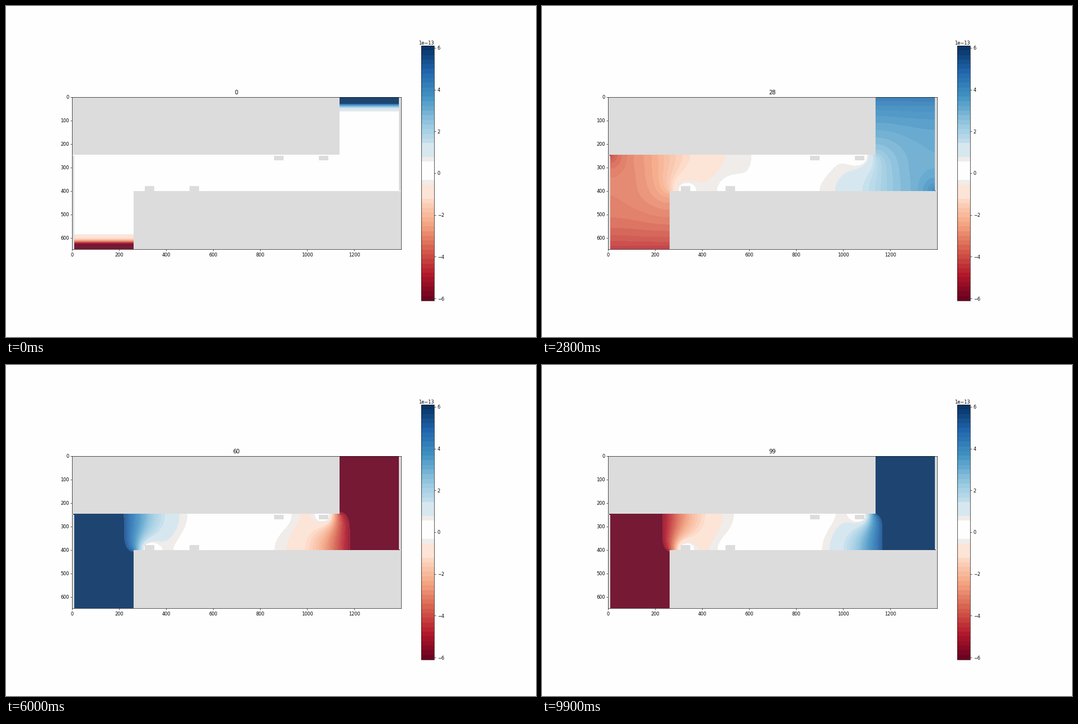
A matplotlib script for the animation above (10 s loop, 947 px wide and 592 px high).

```python
import numpy as np
import matplotlib.pyplot as plt
from matplotlib.animation import FuncAnimation
from matplotlib.cm import ScalarMappable
from matplotlib.colors import ListedColormap, Normalize
from matplotlib.patches import Rectangle

H = 10                    # cell size
ROWS, HALF = 65, 70       # the right half is the left one, rotated and negated
MOUTH, MIDDLE, FLOOR = 260, 700, 650
HALF_CYCLE = 40
PAPER, WALL = "#fefefe", "#dcdcdc"
VMAX = 6.1


def with_twin(rects):
    """Add the copy of each rectangle turned by 180 degrees."""
    return rects + [(1400 - x - w, 650 - y - h, w, h) for x, y, w, h in rects]


BLOCKS = with_twin([(310, 380, 40, 20), (500, 380, 40, 20)])
EDGE = 1.5                # the field reaches this far over the wall line
WALLS = with_twin([(-20, 250, 30 - EDGE, 420),
                   (MOUTH + EDGE, 400 + EDGE, 1160, 270)])
WALLS = [(x, y - EDGE if y < 0 else y, w, h) for x, y, w, h in WALLS]

# ---- domain of the left half ----
jj, ii = np.mgrid[0:ROWS, 0:HALF]
cx, cy = ii * H + 5, jj * H + 5
block = np.zeros((ROWS, HALF), bool)
for bx, by, bw, bh in BLOCKS[:2]:
    block[by // H:(by + bh) // H, bx // H:(bx + bw) // H] = True
arm = (cx > 10) & (cx < MOUTH) & (cy > 400)
duct = (cx > 10) & (cy > 250) & (cy < 400)
active = (arm | duct) & ~block
count = active.sum()
index = -np.ones((ROWS, HALF), int)
index[active] = np.arange(count)


def build_operator():
    """Negative Laplacian: insulated walls, grounded blocks, driven open end."""
    a, end = np.zeros((count, count)), np.zeros(count)
    for p, (j, i) in enumerate(np.argwhere(active)):
        for y, x in ((j + 1, i), (j - 1, i), (j, i + 1), (j, i - 1)):
            if y == ROWS:
                a[p, p] += 1
                end[p] = 1
            elif x == HALF:
                a[p, p] += 1
                a[p, index[ROWS - 1 - y, HALF - 1]] += 1
            elif block[y, x]:
                a[p, p] += 2
            elif index[y, x] >= 0:
                a[p, p] += 1
                a[p, index[y, x]] -= 1
    return a, end


def build_modes():
    """Steady fields for several feeds and several penetration depths."""
    a, end = build_operator()
    feeds = [end]
    feeds += [((cx < MOUTH) * np.exp(-((cy - y) / 80) ** 2))[active] for y in (450, 320)]
    feeds += [((cx > MOUTH) * np.exp(-((cx - x) / 70) ** 2))[active] for x in (330, 450, 600)]
    modes = list(np.linalg.solve(a, np.array(feeds).T).T)
    for k in (0.006, 0.015, 0.03, 0.075):
        modes.append(np.linalg.solve(a + (H * k) ** 2 * np.eye(count), end))
    return [m / np.abs(m).max() for m in modes]


def grow(f):
    """Copy values one cell into the walls."""
    p = np.pad(f, 1, constant_values=np.nan)
    near = np.array([p[:-2, 1:-1], p[2:, 1:-1], p[1:-1, :-2], p[1:-1, 2:]])
    ok = ~np.isnan(near)
    mean = np.nansum(near, 0) / np.maximum(ok.sum(0), 1)
    return np.where(np.isnan(f) & ok.any(0), mean, f)


def unfold(mode):
    half = np.full((ROWS, HALF), np.nan)
    half[active] = mode
    half[block] = 0
    full = np.hstack([half, -half[::-1, ::-1]])
    full = np.nan_to_num(grow(grow(full)))
    return np.pad(full, ((1, 1), (0, 0)), "edge")


modes = build_modes()
radius = np.hypot(cx - 10, cy - 250)[active]
corner = np.maximum(np.log(100 / (radius + 4)), 0)
fields = np.array([unfold(m) for m in modes + [corner]])

# ---- poses: wanted values up the arm and along the duct ----
arm_y = np.arange(645, 290, -20)
duct_x = np.arange(MOUTH + 20, MIDDLE, 20)
probes = np.append(index[arm_y // H, 135 // H], index[265 // H, duct_x // H])
samples = np.array([m[probes] for m in modes]).T


def pose(end, rest, reach, entry, fall, lobe=0, swirl=0):
    """Mode weights for a decay from the open end, then along the duct.

    lobe is a leftover of the other sign, swirl the lag in the dead corner.
    """
    d = duct_x - MOUTH
    span = MIDDLE - MOUTH
    up = rest + (end - rest) * np.exp((arm_y - FLOOR) / reach)
    along = entry * np.exp(-d / fall) * (1 - (d / span) ** 8)
    v = np.append(up, along - lobe * np.sin(np.pi * d / span))
    w = 1 / (0.25 + np.abs(v))
    n = len(modes)
    a = np.vstack([samples * w[:, None], 0.002 * np.eye(n)])
    weights = np.linalg.lstsq(a, np.append(v * w, np.zeros(n)), rcond=None)[0]
    return np.append(weights, swirl)


turn = pose(23, 1.8, 52, 0.55, 60, lobe=1.3, swirl=-0.65)
flood = pose(30, 15.5, 150, 8.8, 135)
ebb = pose(9.5, 7, 200, 5.2, 100)
low = pose(2.9, 1.2, 115, 1.05, 400, swirl=0.6)
PHASES = [0, 8, 23, 35, HALF_CYCLE]
POSES = np.array([turn, flood, ebb, low, -turn])
start = np.zeros(len(fields))
start[len(modes) - 1] = -32


def weights_at(n):
    """Each half cycle repeats with the sign flipped, after a short start."""
    turns, phase = divmod(n + 4, HALF_CYCLE)
    w = np.array([np.interp(phase, PHASES, col) for col in POSES.T])
    w *= 1 if turns % 2 else -1
    s = min(n / 8, 1)
    return start * (1 - s) + w * s


# ---- colours ----
levels = np.linspace(-VMAX, VMAX, 56)
mids = (levels[1:] + levels[:-1]) / 2
rdbu = plt.get_cmap("RdBu")


def tone(v, alpha=1.0):
    if -0.34 < v < 0.56:
        return PAPER
    if -0.56 < v < 0.78:
        return "#efecea"
    if 0.77 < v < 1.45:
        return "#d7e7ef"
    if -1.23 < v < 0:
        return "#fce4d7"
    if alpha < 1 and abs(v) > 5.5:
        v = np.sign(v) * VMAX
    rgb = np.array(rdbu((v / VMAX + 1) / 2)[:3])
    return tuple(rgb * alpha + 1 - alpha)


field_colors = [tone(v, 0.9) for v in mids]
bar_colors = ListedColormap([tone(v) for v in mids])

# ---- figure ----
fig, ax = plt.subplots(figsize=(16, 10.00212), dpi=59.1875, facecolor=PAPER)
ax.set_facecolor(PAPER)
ax.set_aspect("equal")
unit = 1e-13
scale = ScalarMappable(Normalize(-VMAX * unit, VMAX * unit), bar_colors)
fig.colorbar(scale, ax=ax, ticks=np.arange(-6, 7, 2) * unit)
for x, y, w, h in WALLS + BLOCKS:
    ax.add_patch(Rectangle((x, y), w, h, fc=WALL, ec="none", zorder=2))
title = ax.set_title("0")

xs = np.arange(2 * HALF) * H + 5
ys = np.arange(-1, ROWS + 1) * H + 5


def draw(n):
    for c in list(ax.collections):
        c.remove()
    u = np.clip(np.tensordot(weights_at(n), fields, 1), -6, 6)
    ax.contourf(xs, ys, u, levels=levels, colors=field_colors, zorder=1)
    ax.set_xlim(0, 1399)
    ax.set_ylim(649, 0)
    title.set_text(str(n))
    return []


anim = FuncAnimation(fig, draw, frames=100, interval=100, repeat=True,
                     repeat_delay=0, blit=False)
plt.show()
```
